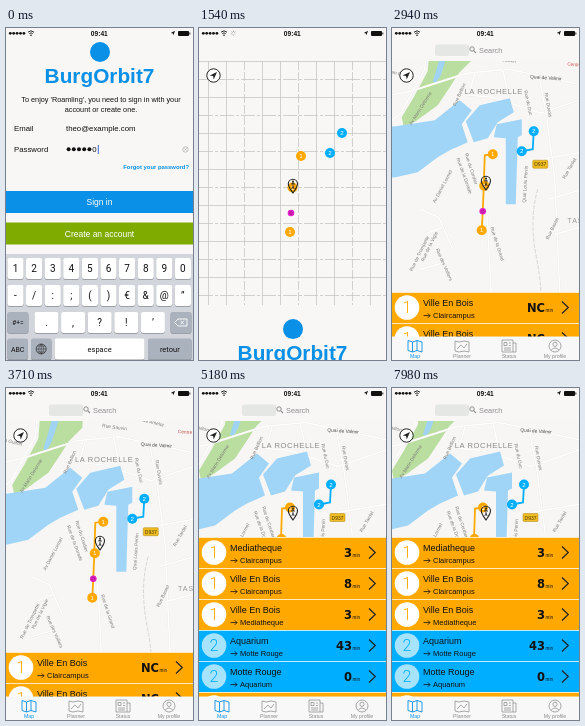
Animation of 187x332 px, one loop 8000 ms. Source, as an HTML page:

```html
<!DOCTYPE html>
<html lang="en">
<head>
<meta charset="utf-8">
<title>Transit app</title>
<style>
html, body { margin: 0; width: 100%; height: 100%; overflow: hidden; background: #f8f7f5; }
svg { display: block; width: 100vw; height: 100vh; }
text { font-family: "Liberation Sans", Arial, sans-serif; }
.num { font-family: "DejaVu Sans", sans-serif; font-weight: bold; }
.key { font-family: Roboto, "Liberation Sans", sans-serif; }
.thin { font-family: Roboto, "Liberation Sans", sans-serif; font-weight: 300; }
</style>
</head>
<body>
<svg id="stage" viewBox="0 0 187 332" preserveAspectRatio="none"></svg>
<script>
const LOOP = 8000;
const BLUE = '#0a90e6', ORANGE = '#ffa800', SKY = '#00aeff';

const text = (x, y, size, s, fill = '#111', extra = '') =>
  `<text x="${x}" y="${y}" font-size="${size}" fill="${fill}" ${extra}>${s}</text>`;
const mid = (x, y, size, s, fill, extra = '') =>
  text(x, y, size, s, fill, 'text-anchor="middle" ' + extra);
const box = (x, y, w, h, fill, r = 0, extra = '') =>
  `<rect x="${x}" y="${y}" width="${w}" height="${h}" rx="${r}" fill="${fill}" ${extra}/>`;
const dot = (x, y, r, fill, extra = '') =>
  `<circle cx="${x}" cy="${y}" r="${r}" fill="${fill}" ${extra}/>`;
const line = (d, color, w, extra = '') =>
  `<path d="${d}" fill="none" stroke="${color}" stroke-width="${w}" ${extra}/>`;
const area = (d, fill) => `<path d="${d}" fill="${fill}"/>`;
const group = (id, inner, extra = '') => `<g id="${id}" ${extra}>${inner}</g>`;

// Map
function mapBase() {
  const water = [
    'M-40 100L5 97 44 91 69 71 81 81 71 95 77 113 59 121 47 128 27 143 5 148-40 150Z',
    'M75 92L89 76 119 69 123 83 107 93 97 109 83 113Z',
    'M106 95L131 90 131 106 127 108 125 175 115 175 115 109 103 108Z'
  ];
  const roads = [
    'M-30 72L20 62 76 44 118 40 220 62', 'M-30 116L10 84 34 40 40-20',
    'M84 44L78 66 102 68 150 84 220 60', 'M112 40L118 68', 'M148 46L156 88 164 150 172 330',
    'M150 130L220 118', 'M158 170L220 152', 'M30 180L48 188 62 220', 'M34 205L52 198',
    'M164 205L220 190', 'M30 240L58 232', 'M96 180L104 330'
  ];
  const labels = [
    [65, 20, 0, 'Parc Clairval', '#5c8a4c'], [120, 14, 12, 'Rue Florent'], [153, 18, -12, 'Rue Tilleur'],
    [115, 22, -8, 'Rue Danoir'], [150, 27, 14, 'Rue Amelot'], [113, 32, 8, 'Rue Sauvin'],
    [155, 50, 4, 'Quai de Valmir', '#444'], [31, 80, -58, 'Av Marin Delorme'],
    [70, 66, -66, 'Rue Bellion'], [53, 158, -62, 'Av Daniel Lormel'], [79, 140, 72, 'Rue du Cordier'],
    [72, 147, 70, 'Rue de la Dorade'], [136, 155, -86, 'Quai Louis Perrin'], [156, 76, 80, 'Rue Duvois'],
    [136, 74, 78, 'Rue du Duc'], [105, 215, 72, 'Rue de la Grand'], [30, 225, -64, 'Rue de Trompette'],
    [40, 218, -64, 'Rue de la Vigie'], [52, 236, 66, 'Rue des Voiliers'],
    [180, 140, -60, 'Rue Tardel'], [163, 200, -64, 'Rue Bastel'],
    [186, 37, 4, 'Centre H', '#d0524c'], [8, 46, 14, 'Jean Guiton']
  ];
  return box(-40, -30, 280, 400, '#f7f6f4') +
    area('M39 16L43-20 84-20 81 31 68 44 59 58 47 76 25 92 13 98 11 88 23 68 37 42Z', '#b9dea0') +
    area('M56 2L64 8 56 28 50 46 45 54 42 52 47 36Z', '#a0d4f5') +
    roads.map(d => line(d, '#ebe9e6', 2) + line(d, '#fff', 1.4)).join('') +
    water.map(d => area(d, '#a0d5f7')).join('') +
    line('M147 160Q138 190 146 230T150 330', '#cfcdca', .8, 'stroke-dasharray="4 1.5"') +
    labels.map(([x, y, a, s, c = '#7d7b78']) =>
      mid(x, y, 4.8, s, c, `transform="rotate(${a} ${x} ${y})"`)).join('') +
    mid(103, 65, 7.6, 'LA ROCHELLE', '#8d8b89', 'letter-spacing=".6"') +
    mid(194, 194, 7, 'TASDOR', '#999', 'letter-spacing="1"') +
    box(142, 131, 15, 8, '#f0bc22', 1, 'stroke="#a98410" stroke-width=".5"') +
    mid(149.5, 137, 5, 'D937', '#4a3b08') +
    line('M102 125L94 126 93 157 92 182 91 201', ORANGE, 1.8) +
    line('M143 102L142 120 131 122', SKY, 1.8);
}

function grid() {
  let s = box(0, 33, 187, 300, '#f8f7f5');
  for (let i = 0; i < 10; i++) s += line(`M${9.5 + 18 * i} 33V332`, '#c2c1bf', .7, i % 3 == 2 ? 'stroke-dasharray="9 2"' : '');
  for (let i = 0; i < 17; i++) s += line(`M0 ${33.5 + 18 * i}H187`, '#c2c1bf', .7, i % 2 ? 'stroke-dasharray="14 2 3 2"' : '');
  return s;
}

const stop = (x, y, n, c) => dot(x, y, 5, c) + mid(x, y + 2.2, 6.2, n, '#fff');
const stops = stop(102, 125, 1, ORANGE) + stop(93.5, 156.5, 1, ORANGE) + stop(91, 201, 1, ORANGE) +
  stop(143, 102, 2, SKY) + stop(131, 122, 2, SKY) +
  dot(92, 182, 3.3, '#e420c6') + dot(92, 182, 1.5, 'none', 'stroke="#8f1682" stroke-width=".6"');

const pin = line('M94 162C91 158 89.3 156 89.3 152.8A4.6 4.6 0 0 1 98.5 152.8C98.5 156 97 158 94 162Z', '#222', 1.1) +
  dot(94, 150.6, 1, '#222') + line('M94 151.5V155.5M92 153.2L94 152 96 153.4M92.8 158L94 155.3 95.2 158', '#222', .8);

const compass = dot(14.5, 47.5, 6.7, '#fff', 'fill-opacity=".85" stroke="#222" stroke-width="1"') +
  area('M18 44L10.7 47.4 14.1 48 14.7 51.4Z', '#222');

// List rows: line, title, direction, value
const FIRST = [[1, 'Ville En Bois', 'Claircampus', 'NC'], [1, 'Ville En Bois', 'Mediatheque', 'NC']];
const FULL = [
  [1, 'Mediatheque', 'Claircampus', 3], [1, 'Ville En Bois', 'Claircampus', 8],
  [1, 'Ville En Bois', 'Mediatheque', 3], [2, 'Aquarium', 'Motte Rouge', 43],
  [2, 'Motte Rouge', 'Aquarium', 0], [1, 'Ville En Bois', 'Claircampus', 8]
];
const list = rows => rows.map(([n, a, b, v], i) => {
  const c = n == 1 ? ORANGE : SKY;
  return `<g transform="translate(0 ${31 * i})">` + box(0, 0, 187, 32, c) +
    box(0, 0, 187, 1, '#fff', 0, 'opacity=".75"') +
    dot(15, 15.5, 12.3, '#fff', n == 2 ? 'opacity=".65"' : '') + mid(15, 21.2, 16, n, c, 'class="thin"') +
    text(31, 14.2, 9, a) + line('M31.5 23.6H38M35.8 21.4L38 23.6 35.8 25.8', '#111', .8) +
    text(41, 26.3, 7.5, b) + text(153, 20, 11.5, v, '#111', 'class="num" text-anchor="end"') +
    text(153.6, 20, 4.6, 'min') + line('M170 9.5L176.3 15.5 170 21.5', '#222', 1.2) + '</g>';
}).join('');

const header = box(0, 0, 187, 33, '#f8f7f5') +
  group('search', box(43, 16.5, 34, 11.5, '#e5e7e4', 2) + dot(80, 21, 2.2, 'none', 'stroke="#8e8e90" stroke-width="1"') +
    line('M81.7 22.7L84 25', '#8e8e90', 1.1) + text(87, 24.7, 7.4, 'Search', '#8e8e90'));

const tabs = box(0, 308.5, 187, 24, '#f8f8f8') +
  line('M16 312.5L20.5 314 25 312.5 30 314V324L25 322.5 20.5 324 16 322.5ZM20.5 314V324M25 312.5V322.5', BLUE, .9) +
  line('M63 313L67 314 72 313 77 314V324L72 323 67 324 63 323ZM65 321L69 317 72 320 75 316', '#929292', .8) +
  line('M110 312H121V324H110ZM121 315H124V324H121M112 314.5H115V317.5H112ZM117 315H119M117 317.5H119M112 320H119M112 322H119', '#929292', .8) +
  dot(163, 318, 6, 'none', 'stroke="#929292" stroke-width=".8"') + dot(163, 316.3, 2.1, 'none', 'stroke="#929292" stroke-width=".8"') +
  line('M159 322.3Q163 317.5 167 322.3', '#929292', .8) +
  [['Map', 23, BLUE], ['Planner', 70], ['Status', 117], ['My profile', 163]]
    .map(([s, x, c = '#8b8b8b']) => mid(x, 330.3, 5.2, s, c)).join('');

// Sign-in page
function keyboard() {
  const GREY = '#aab2be';
  const key = (x, y, w, s, fill = '#fff', size = 10) => box(x, y + .7, w, 21, '#8a8d92', 2.2) +
    box(x, y, w, 21, fill, 2.2) + mid(x + w / 2, y + 10.5 + size * .36, size, s, '#111', 'class="key"');
  const row = (chars, y) => [...chars].map((c, i) =>
    key(1.4 + 18.6 * i, y, 16.2, c == '&' ? '&amp;' : c)).join('');
  return box(0, 226, 187, 106, '#d2d5db') + row('1234567890', 230) + row('-/:;()€&@”', 257) +
    key(1.4, 284, 21, '#+=', GREY, 6.5) + [...'.,?!’'].map((c, i) => key(28.5 + 26.6 * i, 284, 24, c)).join('') +
    key(164.5, 284, 21, '', GREY) +
    line('M168.5 294.5L172 291H181V298H172ZM174.5 292.7L178 296.3M178 292.7L174.5 296.3', '#fff', .9) +
    key(1.4, 310.5, 20.5, 'ABC', GREY, 7) + key(25, 310.5, 20.5, '', GREY) +
    dot(35.2, 321, 5, 'none', 'stroke="#222" stroke-width=".7"') +
    line('M30.2 321H40.2M35.2 316V326M31.5 318H39M31.5 324H39M35.2 316Q30 321 35.2 326Q40.4 321 35.2 316', '#222', .5) +
    key(48.6, 310.5, 90, 'espace', '#fff', 7.5) + key(142, 310.5, 43.6, 'retour', GREY, 7.5);
}

const login = box(0, 0, 187, 340, '#f8f7f5') + dot(94, 24, 10, BLUE) +
  mid(93.5, 55, 20.8, 'BurgOrbit7', BLUE, 'font-weight="bold"') +
  mid(95, 74, 7.3, "To enjoy 'Roamling', you need to sign in with your") + mid(95, 84, 7.3, 'account or create one.') +
  text(8, 102.5, 7.8, 'Email') + text(60, 102.5, 7.8, 'theo@example.com') + text(8, 124, 7.8, 'Password') +
  [0, 1, 2, 3, 4].map(i => dot(62.6 + 5.2 * i, 121.3, 2, '#111')).join('') +
  group('lastChar', text(86.2, 124, 7.8, '0')) + group('lastDot', dot(88.6, 121.3, 2, '#111')) +
  group('caret', box(91.8, 117, 1, 9, '#3d6be0')) +
  dot(179.5, 121.5, 2.7, 'none', 'stroke="#aaa" stroke-width=".7"') + line('M178.4 120.4L180.6 122.6M180.6 120.4L178.4 122.6', '#aaa', .6) +
  text(183, 141, 5.9, 'Forgot your password?', BLUE, 'text-anchor="end" font-weight="bold"') +
  group('signIn', box(0, 163, 187, 22, BLUE) + mid(93.5, 177, 8.5, 'Sign in', '#fff')) +
  box(0, 194.5, 187, 22, '#7fab00') + mid(93.5, 208.5, 8.5, 'Create an account', '#fff') + group('keys', keyboard());

const status = [0, 1, 2, 3, 4].map(i => dot(4.3 + 3.4 * i, 5.3, 1.4, '#111')).join('') +
  line('M22 4.2Q25 1.4 28 4.2M23.3 5.7Q25 4 26.7 5.7', '#111', .9) + dot(25, 7.2, .8, '#111') +
  group('spinner', Array.from({ length: 8 }, (_, i) =>
    line('M0-1.2V-2.7', '#555', .6, `opacity="${.2 + i / 10}" transform="rotate(${45 * i})"`)).join('')) +
  mid(93.3, 7.8, 6.6, '09:41', '#111', 'font-weight="bold"') + area('M169 2.7L164.8 5 167 5.4 167.3 7.6Z', '#111') +
  box(172, 3, 11, 5, '#111', 1) + box(183.4, 4.5, .9, 2, '#111');

document.getElementById('stage').innerHTML =
  box(0, 0, 187, 332, '#f8f7f5') + group('grid', grid()) + group('base', mapBase()) +
  group('stops', stops) + group('pin', pin) + compass +
  group('listA', list(FIRST)) + group('listB', list(FULL)) + header + tabs + group('login', login) + status;

const el = {};
document.querySelectorAll('g[id]').forEach(g => el[g.id] = g);

// Keyed motion: [time, value] pairs, eased between
const ease = p => p < .5 ? 2 * p * p : 1 - 2 * (1 - p) * (1 - p);
const linear = p => p;
function at(keys, t, fn = ease) {
  if (t <= keys[0][0]) return keys[0][1];
  for (let i = 1; i < keys.length; i++) {
    const [a, u] = keys[i - 1], [b, v] = keys[i];
    if (t < b) return u + (v - u) * fn((t - a) / (b - a));
  }
  return keys[keys.length - 1][1];
}
const TRACK = {
  panX: [[2660, 0], [3710, -4.7], [4270, -11]],
  panY: [[1650, 3], [2200, 0], [2660, 0], [3710, 8.7], [4270, 23.5], [4480, 23.5], [5110, -5.5]],
  pinY: [[1650, 3], [2200, 0], [4480, 0], [5110, -30]],
  list: [[1820, 309], [2240, 253], [2660, 253], [2940, 264], [4480, 264], [5110, 149]],
  keys: [[280, 0], [630, 110]],
  login: [[1256, 0], [1656, 332]],
  tiles: [[1680, 0], [2100, 1]],
  search: [[1680, 0], [1900, 1]]
};
const move = (g, x, y) => g.setAttribute('transform', `translate(${x} ${y})`);
const show = (g, v) => g.setAttribute('opacity', +v);

function draw(t) {
  const v = {};
  for (const k in TRACK) v[k] = at(TRACK[k], t, k == 'panX' ? linear : ease);
  move(el.base, v.panX, v.panY);
  move(el.stops, v.panX, v.panY);
  move(el.pin, 0, v.pinY);
  move(el.listA, 0, v.list);
  move(el.listB, 0, v.list);
  move(el.login, 0, v.login);
  move(el.keys, 0, v.keys);
  show(el.base, v.tiles);
  show(el.search, v.search);
  show(el.listA, t < 4410);
  show(el.listB, t >= 4410);
  show(el.lastChar, t < 210);
  show(el.lastDot, t >= 210);
  show(el.caret, t < 280);
  show(el.signIn, t >= 140 && t < 280 ? .6 : 1);
  show(el.spinner, t >= 980 && t < 2600);
  el.spinner.setAttribute('transform', `translate(34.5 5.3) rotate(${Math.floor(t / 85) * 45 % 360})`);
}

const start = performance.now();
function tick() {
  draw((performance.now() - start) % LOOP);
  requestAnimationFrame(tick);
}
tick();
</script>
</body>
</html>
```
